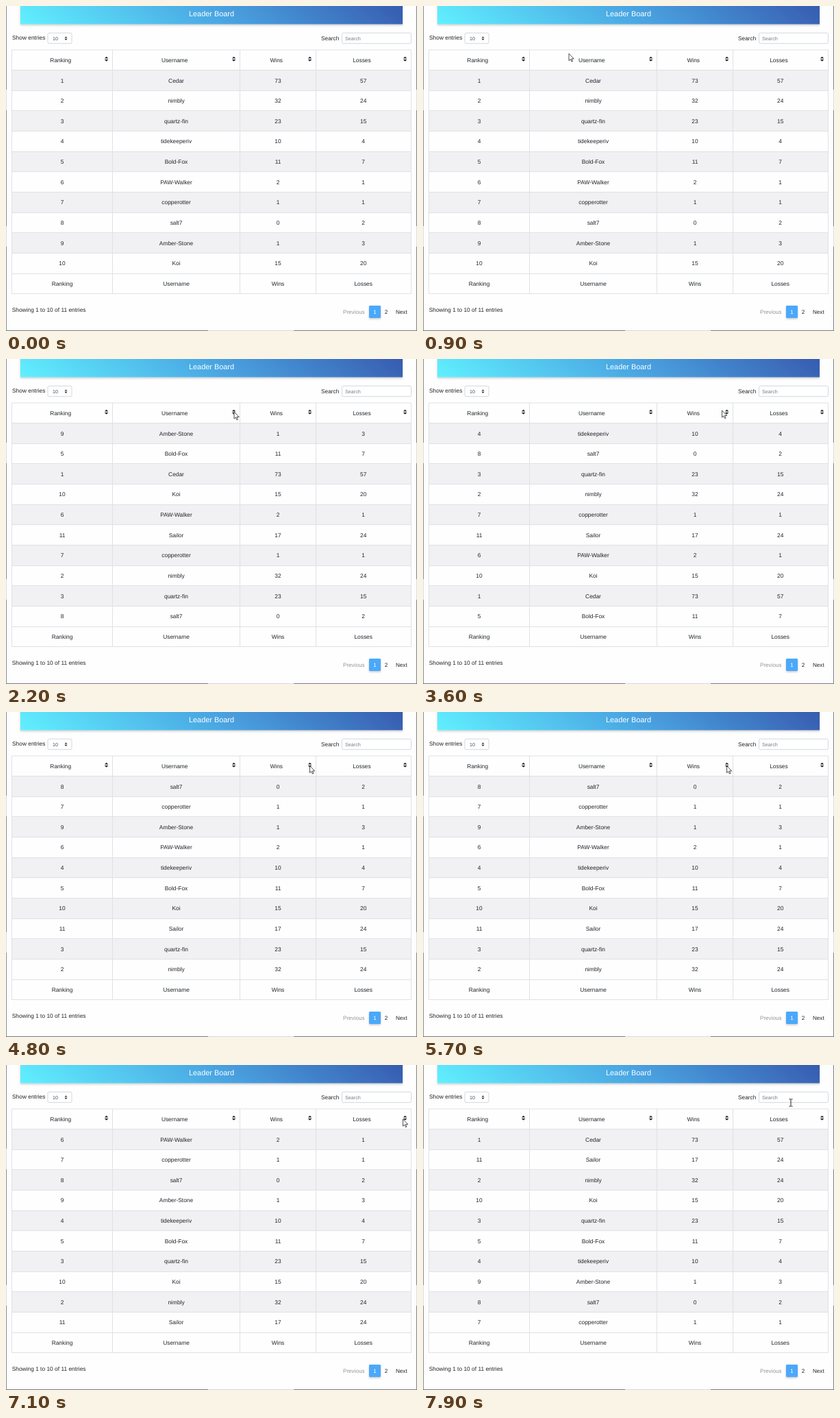
Recreate the animation shown at these times as an HTML page. Size 600x474 px, loop 8000 ms.

```html
<!DOCTYPE html>
<html lang="en">
<head>
<meta charset="utf-8">
<title>Leader Board</title>
<style>
html, body { margin: 0; width: 100%; height: 100%; overflow: hidden; background: #fefefe; }
svg { display: block; width: 100vw; height: 100vh; }
text { font-family: "Liberation Sans", Arial, sans-serif; font-size: 8.4px; fill: #212529; text-rendering: geometricPrecision; }
</style>
</head>
<body>
<svg id="stage" viewBox="0 0 600 474">
  <defs>
    <linearGradient id="blue" gradientUnits="userSpaceOnUse" x1="174" y1="155" x2="426" y2="-145">
      <stop offset="0" stop-color="#60f0ff"/>
      <stop offset=".5" stop-color="#4aa5e2"/>
      <stop offset="1" stop-color="#3656ac"/>
    </linearGradient>
    <filter id="soft" x="-30%" y="-30%" width="160%" height="190%">
      <feDropShadow dx="0" dy="1.5" stdDeviation="1.6" flood-opacity=".22"/>
    </filter>
  </defs>
</svg>
<script>
const LOOP = 8000, STEP = 100, ROWS = 10;
const TOP = 64, HEAD = 94, PITCH = 29.65, BOTTOM = 420;
const EDGES = [8.5, 155.5, 341.5, 452.5, 591.5];
const CENTERS = [82, 248.5, 397, 521.7];
const TITLES = ["Ranking", "Username", "Wins", "Losses"];
const RANK = 0, NAME = 1, WINS = 2, LOSSES = 3;

const players = [
  ["Cedar", 73, 57], ["nimbly", 32, 24], ["quartz-fin", 23, 15], ["tidekeeperiv", 10, 4],
  ["Bold-Fox", 11, 7], ["PAW-Walker", 2, 1], ["copperotter", 1, 1], ["salt7", 0, 2],
  ["Amber-Stone", 1, 3], ["Koi", 15, 20], ["Sailor", 17, 24]
].map((p, i) => [i + 1, ...p]);

// Header clicks: time, column
const clicks = [
  [100, RANK], [600, RANK], [1800, NAME], [3000, NAME], [3900, WINS], [4900, WINS],
  [5600, WINS], [5900, WINS], [6900, LOSSES], [7600, LOSSES]
];

// Pointer stops: time, x, y
const path = [
  [100, 147, 77], [600, 147, 77], [1000, 235, 67], [1400, 327, 74], [1600, 329, 77],
  [1800, 333, 77], [3200, 333, 77], [3600, 436.5, 75], [3700, 436.5, 75], [4000, 443.5, 78.5],
  [5900, 443.5, 78.5], [6600, 579.5, 79], [7600, 579.5, 79], [7900, 537, 55]
];

const stage = document.getElementById("stage");

function add(tag, attrs, content) {
  const el = document.createElementNS("http://www.w3.org/2000/svg", tag);
  for (const k in attrs) el.setAttribute(k, attrs[k]);
  if (content !== undefined) el.textContent = content;
  return stage.appendChild(el);
}
const rect = (x, y, width, height, fill, more) => add("rect", { x, y, width, height, fill, ...more });
const label = (s, x, y, size = 8.4, fill = "#212529", anchor = "start") =>
  add("text", { x, y, "text-anchor": anchor, style: `font-size:${size}px;fill:${fill}` }, s);
const centered = (s, x, y, size, fill) => label(s, x, y, size, fill, "middle");
const line = (x1, y1, x2, y2) => add("path", { d: `M${x1} ${y1}L${x2} ${y2}`, stroke: "#dfe1e5", "stroke-width": 1 });
const field = (x, width) => rect(x, 39.3, width, 15.4, "#fff", { rx: 2, stroke: "#ced4da", "stroke-width": .9 });
const arrows = (x, y, w, h, gap) =>
  add("path", { d: `M${x - w} ${y - gap}h${2 * w}l${-w} ${-h}zM${x - w} ${y + gap}h${2 * w}l${-w} ${h}z`, fill: "#23272b" });

function drawPage() {
  rect(0, 0, 600, 474, "#fefefe");
  rect(0, 0, .8, 474, "#6b7079");
  rect(599.2, 0, .8, 474, "#5c6470");
  rect(0, 473, 600, 1, "#777b82");
  rect(295, 473, 125, 1, "#d3d7db");
  for (const y of [122, 321]) for (const x of [0, 599]) rect(x, y, 1, 30, "#d8dce2");

  rect(21, -10, 558, 36.5, "url(#blue)", { filter: "url(#soft)" });
  centered("Leader Board", 300, 14.5, 10.9, "#fff");

  label("Show entries", 9, 49.3);
  field(61, 35);
  label("10", 68, 49.8, 7.2, "#495057");
  arrows(87.5, 47.2, 2, 2.2, .6);
  label("Search", 460, 49.8, 8.3);
  field(490.5, 101);
  label("Search", 495, 49.8, 7.2, "#737b83");

  for (let i = 0; i < ROWS; i += 2) rect(8.5, HEAD + i * PITCH, 583, PITCH, "#f1f0f2");
  line(8, TOP, 592, TOP);
  for (let i = 0; i <= ROWS + 1; i++) {
    const y = Math.min(BOTTOM, Math.round(HEAD + i * PITCH)) - .5;
    line(8, y, 592, y);
  }
  for (const x of EDGES) line(x, TOP, x, BOTTOM - .5);

  TITLES.forEach((title, c) => {
    centered(title, CENTERS[c] - 2.3, 82);
    centered(title, CENTERS[c], 408);
    arrows(EDGES[c + 1] - 8.9, 77.2, 2.8, 2.7, .8);
  });

  label("Showing 1 to 10 of 11 entries", 8.7, 446.4);
  label("Previous", 492, 448.6, 8.1, "#8e959b");
  rect(530, 437, 17, 18, "#4ba8fa", { rx: 1.2, filter: "url(#soft)" });
  centered("1", 538.5, 448.8, 8.1, "#fff");
  centered("2", 555, 448.8, 8.1);
  label("Next", 569, 448.8, 8.1);
}

drawPage();
const cells = Array.from({ length: ROWS }, (_, r) =>
  CENTERS.map(x => centered("", x, 111.5 + r * PITCH)));
const arrow = add("path", {
  d: "M0 0V10.2L2.3 8.1L3.9 11.7L5.5 11L3.9 7.5H7.2Z",
  fill: "#fff", stroke: "#222", "stroke-width": .8, "stroke-linejoin": "round"
});
const beam = add("path", {
  d: "M-2.5 -5.2H-.6L0 -4.6L.6 -5.2H2.5M0 -4.6V4.6M-2.5 5.2H-.6L0 4.6L.6 5.2H2.5",
  fill: "none", stroke: "#222", "stroke-width": 1
});

// A new column sorts upward; clicking it again reverses the list.
function rowsAt(t) {
  let list = players.slice(), active = RANK;
  for (const [at, col] of clicks) {
    if (at > t) break;
    if (col === active) list.reverse();
    else list.sort((a, b) => a[col] < b[col] ? -1 : a[col] > b[col] ? 1 : 0);
    active = col;
  }
  return list;
}

function pointerAt(t) {
  const i = path.findIndex(p => p[0] > t);
  if (i < 0) return path[path.length - 1].slice(1);
  const [t0, x0, y0] = path[i - 1], [t1, x1, y1] = path[i];
  const k = (t - t0) / (t1 - t0);
  return [x0 + (x1 - x0) * k, y0 + (y1 - y0) * k];
}

function render(time) {
  const t = Math.floor(time % LOOP / STEP) * STEP;
  const list = rowsAt(t);
  cells.forEach((row, r) => row.forEach((cell, c) => {
    const value = String(list[r][c]);
    if (cell.textContent !== value) cell.textContent = value;
  }));

  const typing = t >= 7900, visible = t >= path[0][0];
  arrow.setAttribute("visibility", visible && !typing ? "visible" : "hidden");
  beam.setAttribute("visibility", typing ? "visible" : "hidden");
  if (visible) {
    const [x, y] = pointerAt(t);
    (typing ? beam : arrow).setAttribute("transform", `translate(${x} ${y})`);
  }
}

const start = performance.now();
function tick() {
  render(performance.now() - start);
  requestAnimationFrame(tick);
}
tick();
</script>
</body>
</html>
```
